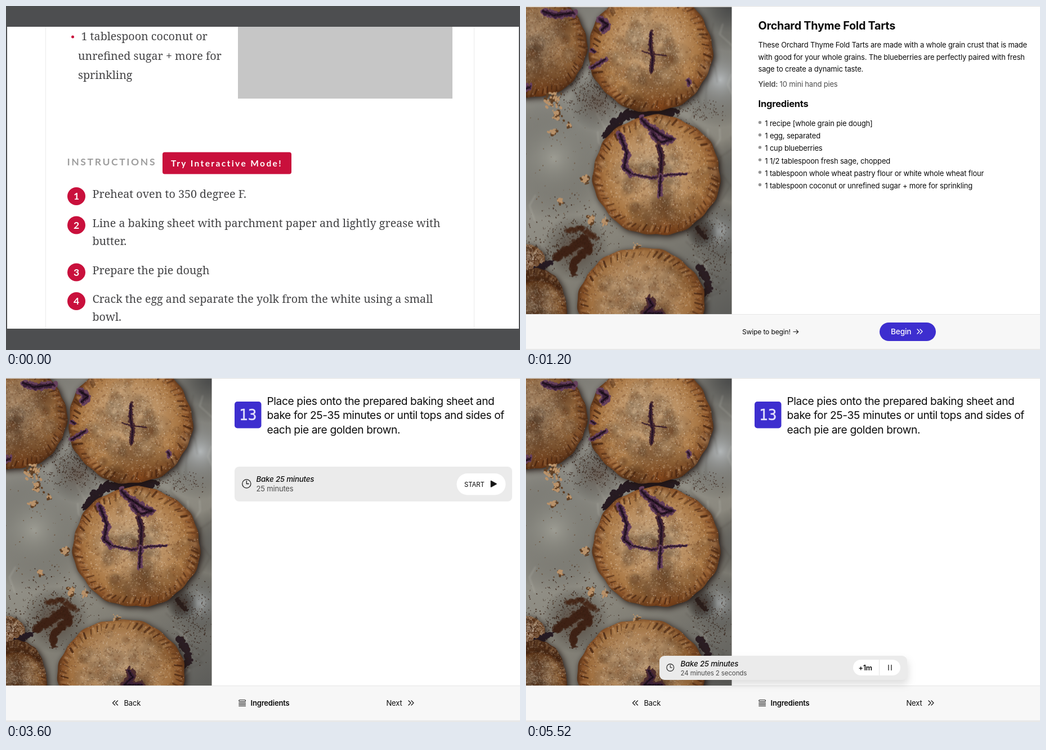
An HTML page with a canvas for the animation above (6000 ms loop, 913x613 px).

```html
<!DOCTYPE html>
<html lang="en">
<head>
<meta charset="utf-8">
<title>Recipe with interactive mode</title>
<style>
html, body { margin: 0; width: 100%; height: 100%; overflow: hidden; background: #fff; }
#stage { position: absolute; left: 0; top: 0; width: 913px; height: 613px; overflow: hidden; }
canvas, svg { position: absolute; left: 0; top: 0; }
svg { width: 913px; height: 613px; visibility: hidden; }
text { font: 13px Inter, "Open Sans", sans-serif; letter-spacing: -.014em; fill: #0c0c0c; white-space: pre; }
.serif { font: 19.7px "Noto Serif", serif; letter-spacing: 0; fill: #434345; }
.lato { font: 700 17.5px Lato, sans-serif; letter-spacing: 0; fill: #fff; }
.heading { letter-spacing: 2.6px; fill: #9e9e9e; }
.try { font-size: 15.5px; letter-spacing: 2.4px; }
.title { font-size: 19.8px; font-weight: 700; }
.sub { font-size: 16.5px; font-weight: 700; }
.step { font-size: 19.2px; letter-spacing: -.4px; }
.badge { font: 26px "DejaVu Sans Mono", monospace; letter-spacing: 0; fill: #e4e1fb; stroke: #e4e1fb; stroke-width: .4px; text-anchor: middle; }
.item { font-size: 13.3px; }
.bold { font-weight: 600; }
.task { font-size: 13.3px; font-weight: 500; font-style: italic; }
.grey { fill: #4c4c4c; }
.line { fill: none; stroke: #1c1c1c; stroke-linecap: round; stroke-linejoin: round; }
.float { fill: #ebebeb; filter: drop-shadow(2px 8px 7px rgba(0, 0, 0, .13)); }
</style>
</head>
<body>
<div id="stage"><canvas id="photo" width="366" height="548"></canvas></div>
<script>
const stage = document.getElementById('stage');
const photo = document.getElementById('photo');
const BLUE = '#3d2ecf', RED = '#c9103c';

// Markup helpers
const text = (x, y, s, cls = '', attr = '') => `<text x="${x}" y="${y}" class="${cls}" ${attr}>${s}</text>`;
const rect = (x, y, w, h, fill, r = 0, cls = '') =>
  `<rect x="${x}" y="${y}" width="${w}" height="${h}" rx="${r}" class="${cls}" ${fill ? `fill="${fill}"` : ''}/>`;
const dot = (x, y, r, fill) => `<circle cx="${x}" cy="${y}" r="${r}" fill="${fill}"/>`;
const line = (d, w = 1.3, attr = '') => `<path class="line" d="${d}" stroke-width="${w}" ${attr}/>`;
const lines = (x, y, gap, list, cls) => list.map((s, i) => text(x, y + i * gap, s, cls)).join('');
const clock = (x, y, r) => line('M0-9a9 9 0 1 1 0 18a9 9 0 1 1 0-18M0-6v6h4.5', 1.5,
  `transform="translate(${x} ${y}) scale(${r / 9})"`);
const chevrons = (x, y, dir, attr = '') =>
  line(`M${x} ${y - 4}l${4 * dir} 4l${-4 * dir} 4m${5 * dir}-8l${4 * dir} 4l${-4 * dir} 4`, 1.35, attr);
const badge = (x, y, n) => rect(x, y, 47.5, 47.5, BLUE, 5) + text(x + 23.7, y + 33, n, 'badge');

const frame = (y, bottom) =>
  rect(0, 0, 913, 1, '#dedede') + rect(365.5, 1, 548, y, '#fff') +
  rect(0, y, 913, 613 - y, '#f7f7f7') + rect(0, y, 913, 1, '#e6e6e6') +
  rect(0, bottom, 913, 613 - bottom, '#e8e8e8');

const nav = () => frame(548, 610) +
  chevrons(199, 579, -1, 'transform="translate(-.5 0)"') + text(209.5, 584, 'Back') +
  line('M3.75 12h16.5m-16.5 3.75h16.5M3.75 19.5h16.5M5.625 4.5h12.75a1.875 1.875 0 0 1 0 3.75H5.625a1.875 1.875 0 0 1 0-3.75z',
    1.5, 'transform="translate(411 570.5) scale(.72)"') +
  text(434.5, 584, 'Ingredients', 'bold') +
  text(675.5, 584, 'Next') + chevrons(715, 579, 1);

const ingredients = [
  '1 recipe [whole grain pie dough]',
  '1 egg, separated',
  '1 cup blueberries',
  '1 1/2 tablespoon fresh sage, chopped',
  '1 tablespoon whole wheat pastry flour or white whole wheat flour',
  '1 tablespoon coconut or unrefined sugar + more for sprinkling'
];

const recipePage = () => {
  const steps = [[339, 'Preheat oven to 350 degree F.'],
    [390.5, 'Line a baking sheet with parchment paper and lightly grease with', 'butter.'],
    [474.5, 'Prepare the pie dough'],
    [526, 'Crack the egg and separate the yolk from the white using a small', 'bowl.']];
  return rect(0, 0, 913, 613, '#4d4e50') + rect(2, 37, 909, 538, '#fff') +
    rect(70, 37, 1, 538, '#ebebeb') + rect(831, 37, 1, 538, '#ebebeb') +
    rect(412, 37, 381, 128, '#c6c6c6') + dot(118.5, 55, 2.5, RED) +
    text(133.5, 61, '1 tablespoon coconut or', 'serif') +
    lines(128, 95.5, 34.5, ['unrefined sugar + more for', 'sprinkling'], 'serif') +
    text(108.5, 284, 'INSTRUCTIONS', 'lato heading') +
    rect(278, 260.5, 229, 39, RED, 4) + text(293, 285.5, 'Try Interactive Mode!', 'lato try') +
    steps.map(([y, ...body], i) => dot(125, y, 16, RED) +
      text(125, y + 6, i + 1, 'lato', 'text-anchor="middle"') +
      lines(153.5, y + 3, 32, body, 'serif')).join('');
};

const introPage = () => frame(549, 611) +
  text(412.5, 42, 'Orchard Thyme Fold Tarts', 'title') +
  lines(412.5, 74, 21.5, [
    'These Orchard Thyme Fold Tarts are made with a whole grain crust that is made',
    'with good for your whole grains. The blueberries are perfectly paired with fresh',
    'sage to create a dynamic taste.']) +
  text(412.5, 144, '<tspan class="bold">Yield:</tspan> 10 mini hand pies', 'grey') +
  text(412.5, 180, 'Ingredients', 'sub') +
  ingredients.map((s, i) => dot(415.5, 207.5 + i * 22.2, 2.7, '#949494') + text(424.3, 214 + i * 22.2, s)).join('') +
  text(384, 585, 'Swipe to begin!', '', 'style="font-size:12.1px"') +
  line('M475 580.5h8.5m-3.3-3.4l3.4 3.4l-3.4 3.4', 1.2) +
  rect(628, 564, 100, 33, BLUE, 16.5) +
  text(648, 585, 'Begin', '', 'style="font-size:13.7px;font-weight:500;fill:#fff"') +
  chevrons(695, 580, 1, 'style="stroke:#fff"');

const ingredientsPage = () => `<g transform="translate(1 0)">${nav()}</g>` +
  rect(0, 0, 1, 613, '#35a598') +
  badge(407, 29.5, 11) +
  lines(464.5, 48, 25.4, ['Using a pastry brush, brush the top of the dough', 'with the egg white wash.'], 'step') +
  rect(238, 337, 439, 201, '', 9, 'float') +
  text(252, 368, 'Ingredients', 'bold', 'style="font-size:13.6px"') +
  line('M647.5 359l8 8m0-8l-8 8', 1.3) +
  lines(252, 400, 23.7, ingredients, 'item');

const bakeStep = () => nav() + badge(406, 42, 13) +
  lines(463.5, 48, 25.3, ['Place pies onto the prepared baking sheet and',
    'bake for 25-35 minutes or until tops and sides of', 'each pie are golden brown.'], 'step');

const timerPage = () => bakeStep() +
  rect(406, 158, 493, 62, '#ebebeb', 8) + clock(427.3, 188.5, 7.6) +
  text(444.5, 184.5, 'Bake 25 minutes', 'task') + text(444.5, 202, '25 minutes', 'grey') +
  rect(800.5, 170, 87, 38.5, '#fff', 19.2) +
  text(814, 193.5, 'START', '', 'style="font-size:11.5px"') +
  line('M861.5 183.5v10.5l9.5-5.25z', 1.6, 'style="fill:#111"');

const runningPage = () => bakeStep() +
  rect(237, 495, 440, 43, '', 9, 'float') + clock(256.3, 516, 6.4) +
  text(274.5, 513.5, 'Bake 25 minutes', 'task') +
  text(274.5, 530, '24 minutes 2 seconds', 'grey', 'style="font-size:11.6px"') +
  rect(581, 502, 84, 28, '#fff', 14) + rect(627, 502, 1, 28, '#e3e3e3') +
  text(590.5, 521, '+1m', 'bold', 'style="font-size:12.5px"') +
  line('M644 511.5v9m5-9v9', 1.3);

// Soft stand-in for the photograph
function paintPhoto() {
  const c = photo.getContext('2d');
  let seed = 7;
  const rnd = () => (seed = (seed * 16807) % 2147483647) / 2147483647;
  const bell = () => rnd() + rnd() + rnd() - 1.5;
  const grain = (n, x, y, sx, sy, color, size) => {
    c.fillStyle = color;
    for (let i = 0; i < n; i++) {
      c.beginPath();
      c.ellipse(x + bell() * sx, y + bell() * sy, size * (.3 + rnd()), size * (.3 + rnd() * .6), rnd() * 3, 0, 7);
      c.fill();
    }
  };
  const glow = (x, y, r, color) => {
    const g = c.createRadialGradient(x, y, 0, x, y, r);
    g.addColorStop(0, color);
    g.addColorStop(1, 'transparent');
    c.fillStyle = g;
    c.fillRect(x - r, y - r, 2 * r, 2 * r);
  };
  const smear = (pts, w, color, blur = 1) => {
    c.save();
    c.filter = `blur(${blur}px)`;
    c.lineWidth = w;
    c.lineCap = c.lineJoin = 'round';
    c.strokeStyle = color;
    c.beginPath();
    pts.forEach(([x, y]) => c.lineTo(x, y));
    c.stroke();
    c.restore();
  };
  // Ragged trail of small spots along a line
  const trail = (pts, w, color) => {
    for (let i = 1; i < pts.length; i++) {
      const [x, y] = pts[i - 1], [u, v] = pts[i];
      const n = Math.ceil(Math.hypot(u - x, v - y) / 1.2);
      for (let k = 0; k <= n; k++)
        grain(2, x + (u - x) * k / n, y + (v - y) * k / n, w * .3, w * .3, color, w * .34);
    }
  };
  const juice = (pts, w, stain = '#66405c') => {
    trail(pts, w, stain);
    trail(pts, w * .6, '#3b2038');
    trail(pts, w * .25, '#1b1019');
  };
  const slit = (pts, w) => juice(pts, w, '#4d2d2e');

  const pie = (x, y, rx, ry, shade = 0) => {
    const at = (a, k) => {
      const r = k * (1 + .012 * Math.sin(7 * a + x) + .008 * Math.sin(19 * a));
      return [x + rx * r * Math.cos(a), y + ry * r * Math.sin(a)];
    };
    c.save();
    c.beginPath();
    for (let a = 0; a < 6.28; a += .04) c.lineTo(...at(a, 1));
    c.closePath();
    c.shadowColor = 'rgba(28,17,14,.95)';
    c.shadowBlur = 12;
    c.shadowOffsetX = 3;
    c.shadowOffsetY = 3;
    const g = c.createRadialGradient(x - 8, y - 20, 8, x, y, rx * 1.02);
    [[0, '#c4a27b'], [.5, '#b98e60'], [.76, '#a97744'], [.9, '#8b5429'], [1, '#573219']]
      .forEach(s => g.addColorStop(...s));
    c.fillStyle = g;
    c.fill();
    c.clip();
    c.shadowColor = 'transparent';
    for (let i = 0; i < 60; i++)
      glow(x + bell() * rx, y + bell() * ry, 8 + rnd() * 16, i % 2 ? 'rgba(226,195,157,.3)' : 'rgba(112,60,24,.3)');
    glow(x + 15, y + ry * .92, 75, 'rgba(122,58,16,.6)');
    for (let i = 0; i < 56; i++) {
      const a = i * .113 + rnd() * .08;
      smear([at(a, .83 + rnd() * .06), at(a + .04, .92 + rnd() * .05)], 1.5 + rnd() * 2.5,
        `rgba(62,31,15,${.25 + rnd() * .5})`, .7);
      smear([at(a + .06, .84 + rnd() * .05), at(a + .09, .95)], 3, `rgba(214,168,116,${rnd() * .5})`, .9);
    }
    grain(500, x, y, rx * 1.2, ry * 1.2, 'rgba(96,52,24,.22)', 2.4);
    grain(380, x, y, rx * 1.2, ry * 1.2, 'rgba(225,196,160,.2)', 2.4);
    grain(1100, x, y, rx * 1.2, ry * 1.2, 'rgba(244,230,214,.42)', 1);
    grain(450, x, y, rx * 1.2, ry * 1.2, 'rgba(74,38,18,.45)', 1);
    c.fillStyle = `rgba(48,24,12,${shade})`;
    c.fillRect(0, 0, 366, 548);
    c.restore();
  };

  const paper = c.createLinearGradient(0, 0, 366, 548);
  [[0, '#77756f'], [.35, '#999890'], [.65, '#87847a'], [1, '#5c5c59']].forEach(s => paper.addColorStop(...s));
  c.fillStyle = paper;
  c.fillRect(0, 0, 366, 548);
  glow(345, 130, 85, 'rgba(196,203,210,.65)');
  glow(345, 400, 55, 'rgba(186,195,203,.5)');
  glow(50, 270, 110, 'rgba(160,160,150,.6)');
  glow(366, 0, 80, 'rgba(46,48,51,.75)');
  glow(375, 290, 60, 'rgba(70,72,74,.5)');
  for (let i = 0; i < 60; i++) {
    const x = rnd() * 366, y = rnd() * 548;
    smear([[x, y], [x + bell() * 24, y + 18], [x + bell() * 40, y + 45]], 2.5,
      i % 2 ? 'rgba(220,220,210,.2)' : 'rgba(55,52,46,.16)', 1.5);
  }

  // Burnt juice and loose crumbs on the paper
  glow(88, 430, 60, 'rgba(66,38,24,.6)');
  glow(128, 170, 52, 'rgba(66,46,36,.55)');
  glow(312, 402, 28, 'rgba(52,32,25,.8)');
  trail([[52, 448], [78, 432], [104, 412], [112, 432], [86, 452], [82, 474]], 17, 'rgba(62,34,22,.7)');
  trail([[72, 400], [98, 394], [124, 412]], 12, 'rgba(72,41,25,.45)');
  trail([[142, 232], [155, 212], [178, 192], [215, 188], [264, 187]], 18, '#271b22');
  trail([[306, 462], [322, 486], [325, 502], [316, 512]], 15, '#2b1e23');
  trail([[304, 394], [312, 405], [320, 412]], 10, '#2b1e1b');
  grain(420, 122, 155, 58, 42, 'rgba(52,32,22,.8)', 1.2);
  grain(420, 85, 415, 75, 58, 'rgba(52,30,18,.75)', 1.3);
  grain(280, 328, 430, 38, 66, 'rgba(49,31,22,.75)', 1.2);
  grain(140, 300, 188, 60, 22, 'rgba(58,37,27,.7)', 1.2);
  grain(110, 65, 300, 100, 170, 'rgba(98,66,38,.65)', 1.2);

  pie(14, 69, 94, 92, .2);
  pie(-2, 452, 36, 29, .1);
  trail([[0, 480], [22, 468], [44, 454]], 13, '#261a22');
  pie(20, 540, 52, 74, .25);
  pie(221, 79, 110, 108);
  pie(205, 530, 113, 101, .08);
  pie(232, 300, 113, 107);

  juice([[30, 8], [50, 15], [84, 11]], 15);
  juice([[0, 146], [7, 143]], 12);
  juice([[132, 22], [145, 32], [135, 41]], 15);
  juice([[116, 76], [122, 80]], 9);
  juice([[116, 109], [128, 102], [141, 93]], 10);
  juice([[288, 131], [291, 137]], 11);
  slit([[222, 45], [221, 70], [225, 92], [223, 116]], 9);
  slit([[206, 79], [222, 84], [249, 87]], 3.5);
  juice([[205, 200], [216, 212], [232, 222], [246, 232], [259, 236], [238, 242], [225, 226]], 14);
  juice([[166, 226], [173, 244], [179, 262], [174, 287], [188, 298]], 13);
  juice([[188, 298], [224, 305], [255, 299], [285, 298]], 7);
  slit([[235, 246], [241, 265], [239, 300]], 12);
  juice([[239, 300], [237, 337]], 10);
  slit([[218, 521], [225, 532], [210, 546], [242, 546]], 15);

  const clusters = [[48, 166, 13, 12], [55, 190, 9, 7], [48, 222, 7, 5], [76, 210, 4, 3],
    [116, 378, 7, 7], [104, 308, 7, 5], [139, 383, 5, 4], [60, 344, 4, 4], [195, 428, 8, 3]];
  clusters.forEach(([x, y, s, n]) => {
    grain(n * 2, x + 1, y + 2, s, s, '#5f3f24', 3.4);
    grain(n * 2, x, y, s, s, '#b9926a', 3.2);
  });
}

// Each screen holds for the same time; the photo shifts slightly with it.
const HOLD = 1200;
const screens = [
  { draw: recipePage },
  { draw: introPage, at: [0, 1.5] },
  { draw: ingredientsPage, at: [1, 1] },
  { draw: timerPage, at: [0, 1] },
  { draw: runningPage, at: [0, 1] }
];

for (const s of screens) {
  stage.insertAdjacentHTML('beforeend', `<svg viewBox="0 0 913 613">${s.draw()}</svg>`);
  s.el = stage.lastElementChild;
}

let current = -1;
function show(now) {
  const next = Math.floor(now / HOLD) % screens.length;
  if (next !== current) {
    screens.forEach((s, i) => { s.el.style.visibility = i === next ? 'visible' : 'hidden'; });
    const [x, y] = screens[next].at || [0, 0];
    photo.style.transform = `translate(${x}px, ${y}px)`;
    current = next;
  }
}

paintPhoto();
const start = performance.now();
function tick() {
  show(performance.now() - start);
  requestAnimationFrame(tick);
}
tick();
</script>
</body>
</html>
```
